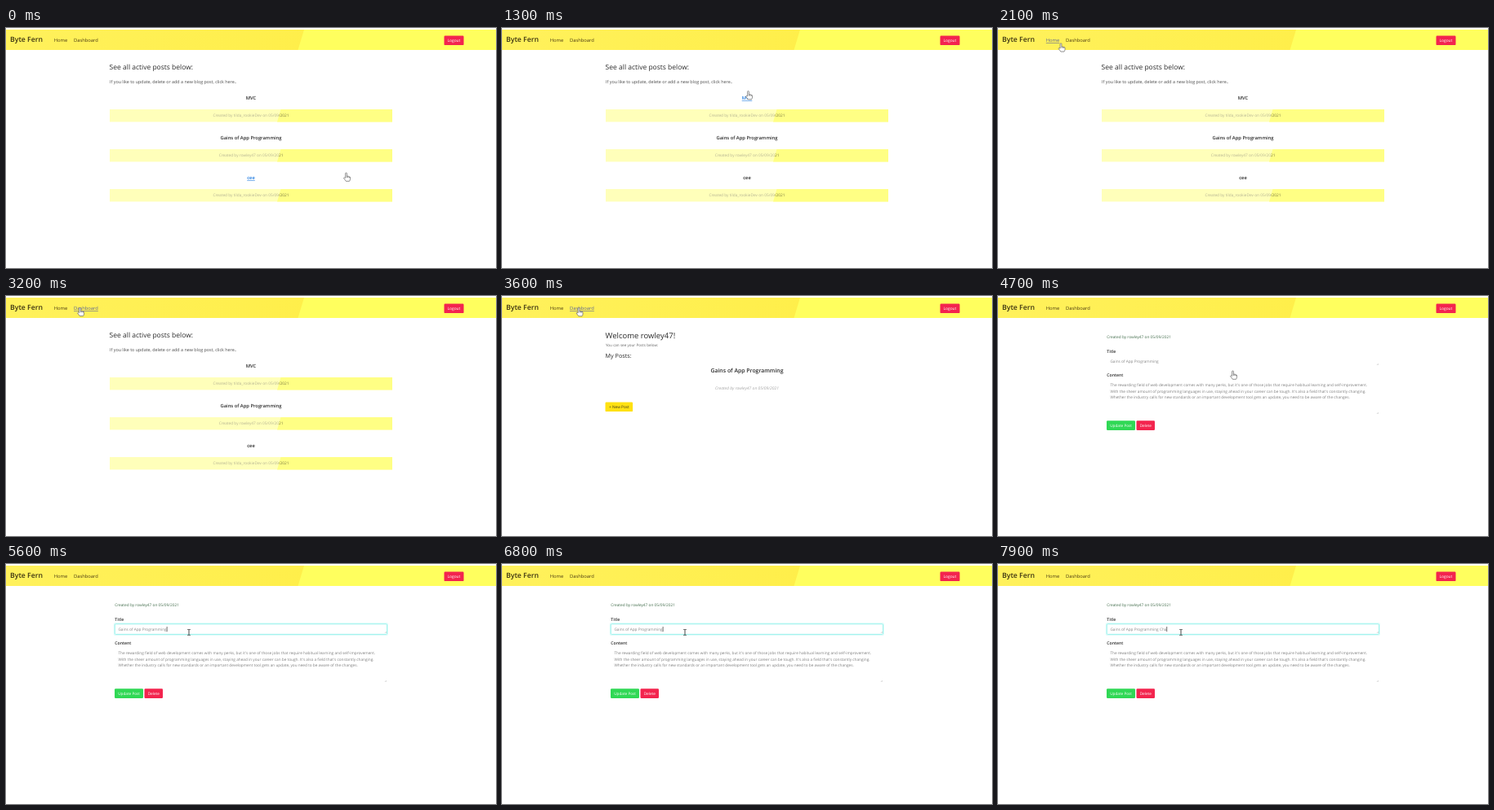
Animation, 600 px wide and 295 px high, one loop 8 s. Source, as an HTML page:

```html
<!DOCTYPE html>
<html lang="en">
<head>
<meta charset="utf-8">
<title>Blog walkthrough</title>
<style>
html, body { margin: 0; width: 100%; height: 100%; overflow: hidden; background: #fff; }
svg { display: block; width: 100%; height: 100%; }
text { font-family: "Open Sans", "Noto Sans", sans-serif; white-space: pre; text-rendering: geometricPrecision; }
</style>
</head>
<body>
<svg id="stage" viewBox="0 0 600 295">
  <defs>
    <linearGradient id="navFill">
      <stop offset="0" stop-color="#fff15c"/>
      <stop offset="1" stop-color="#ffed3f"/>
    </linearGradient>
    <linearGradient id="ink" gradientUnits="userSpaceOnUse" x1="0" x2="600">
      <stop offset=".556" stop-color="#b5b392"/>
      <stop offset=".556" stop-color="#77743f"/>
    </linearGradient>
  </defs>
  <g id="nav"></g>
  <g id="home"></g>
  <g id="dash"></g>
  <g id="edit"></g>
  <g id="cursor">
    <path id="hand" d="M-.9 6.3V.9A.9 .9 0 0 1 .9 .9V4.2Q1.8 3.6 2.4 4.5Q3.3 3.9 3.8 4.9Q5 4.5 5 6V7.5Q5 9 4 10.3H-.2Q-1.4 8.6 -3 6.5Q-2.6 5.2 -.9 6.3ZM.9 4.2V6M2.4 4.5V6M3.8 4.9V6.2" fill="#fff" stroke="#555" stroke-width=".65" stroke-linejoin="round"/>
    <path id="arrow" d="M0 0V8.6L2 6.8L3.3 9.7L4.6 9.1L3.3 6.3H6Z" fill="#fff" stroke="#444" stroke-width=".6"/>
    <path id="beam" d="M-1.7 -3.5H-.5L0 -3L.5 -3.5H1.7M0 -3V3M-1.7 3.5H-.5L0 3L.5 3.5H1.7" fill="none" stroke="#333" stroke-width=".9"/>
  </g>
</svg>
<script>
const LOOP = 8000;
const BLOG = "Byte Fern", USER = "rowley47", OTHER = "tilda_rookieDev";
const POST = "Gains of App Programming";
const LINK = "#1f7be0", DARK = "#2b2b2b", RED = "#f3244e";

const $ = id => document.getElementById(id);

function add(parent, tag, attrs) {
  const el = document.createElementNS("http://www.w3.org/2000/svg", tag);
  for (const k in attrs) el.setAttribute(k, attrs[k]);
  return parent.appendChild(el);
}

function label(parent, str, x, y, size, fill = DARK, extra = {}) {
  const el = add(parent, "text", { x, y, "font-size": size, fill, ...extra });
  el.textContent = str;
  return el;
}

const box = (parent, x, y, width, height, fill, rx = 0) =>
  add(parent, "rect", { x, y, width, height, fill, rx });

const shape = (parent, d, fill) => add(parent, "path", { d, fill });

const mid = { "text-anchor": "middle" };
const semi = { "font-weight": 600 };
const created = name => `Created by ${name} on 05/09/2021`;

function hover(el, on, plain, lit = LINK) {
  el.setAttribute("fill", on ? lit : plain);
  el.setAttribute("text-decoration", on ? "underline" : "none");
}

// Navigation bar
const nav = $("nav"), NAV_INK = "#4b3b12";
box(nav, 0, 2, 600, 25, "url(#navFill)");
shape(nav, "M365 2H600V27H357.5Z", "#ffff5e");
label(nav, BLOG, 5, 17.2, 8.7, "#3a3110", semi);
const homeLink = label(nav, "Home", 58.8, 17.1, 5.8, NAV_INK);
const dashLink = label(nav, "Dashboard", 83, 17.1, 5.8, NAV_INK);
box(nav, 536.5, 9.5, 24, 11.6, RED, 1.2);
label(nav, "Logout", 548.4, 17.1, 4.9, "#fff", mid);

// List of all posts
const home = $("home");
label(home, "See all active posts below:", 126.6, 50.6, 8.5, DARK, { "font-weight": 500 });
label(home, "If you like to update, delete or add a new blog post, click here..", 127, 68.4, 5.38, "#4a4a4a");
const rows = [["MVC", OTHER], [POST, USER], ["cee", OTHER]].map(([title, name], i) => {
  const y = 100 + i * 49;
  box(home, 127, y, 346, 15.4, "#ffffba");
  shape(home, `M336.5 ${y}H473V${y + 15.4}H332Z`, "#ffff84");
  label(home, created(name), 300, y + 9.2, 4.77, "url(#ink)", mid);
  return label(home, title, 300, y - 11.8, 5.8, DARK, { ...mid, ...semi });
});

// Own posts
const dash = $("dash");
label(dash, `Welcome ${USER}!`, 126.6, 51.6, 9.5, DARK);
label(dash, "You can see your Posts below:", 127, 61.6, 4.6, "#666");
label(dash, "My Posts:", 126.6, 75.9, 7.2, DARK);
const ownPost = label(dash, POST, 300, 93.8, 6.9, DARK, { ...mid, ...semi });
label(dash, created(USER), 300, 115, 5, "#a8a8a8", { ...mid, "font-style": "italic" });
box(dash, 126.5, 130.5, 33.6, 11.6, "#ffe112", 1.2);
label(dash, "+ New Post", 143.4, 138.1, 4.75, "#3d3a20", mid);

// Edit form
const edit = $("edit");
label(edit, created(USER), 133.2, 51.6, 4.77, "#456f4e");
label(edit, "Title", 133.3, 69.7, 5.2, DARK, semi);
label(edit, "Content", 133.3, 99.4, 5.2, DARK, semi);
const focus = add(edit, "g", {});
for (const [grow, width, opacity] of [[.7, 1.6, .3], [0, .8, 1]])
  add(focus, "rect", {
    x: 133.3 - grow, y: 73.8 - grow, width: 333.2 + 2 * grow, height: 12.6 + 2 * grow,
    rx: 1.2, fill: "none", stroke: "#8cf0ea", "stroke-width": width, opacity
  });
for (const y of [84.8, 144.8])
  add(edit, "path", { d: `M464 ${y}l1.8 -1.8M465.2 ${y}l.7 -.7`, stroke: "#999", "stroke-width": .4 });
const field = label(edit, POST, 137.4, 81.8, 4.74, "#858585");
const caret = box(edit, 0, 77, .7, 6.2, "#333");
[
  "The rewarding field of web development comes with many perks, but it's one of those jobs that require habitual learning and self-improvement.",
  "With the sheer amount of programming languages in use, staying ahead in your career can be tough. It's also a field that's constantly changing.",
  "Whether the industry calls for new standards or an important development tool gets an update, you need to be aware of the changes."
].forEach((line, i) => label(edit, line, 137.4, 111.4 + i * 7.5, 4.74, "#7d7d7d"));
box(edit, 133, 153.2, 35, 11.8, "#30d855", 1.2);
label(edit, "Update Post", 150.6, 160.9, 4.7, "#fff", mid);
box(edit, 169.5, 153.2, 22.5, 11.8, RED, 1.2);
label(edit, "Delete", 180.8, 160.9, 4.75, "#fff", mid);

// Pointer stops: time, x, y
const path = [
  [0, 416.5, 178], [600, 416.5, 178], [700, 417.6, 176], [900, 414.5, 176.5],
  [1100, 414.5, 176.5], [1200, 376, 147], [1300, 301.5, 77.5], [1400, 222, 51],
  [1500, 176, 45], [1600, 176, 45], [1800, 138, 35], [2000, 88, 21], [2200, 66, 16.5],
  [3000, 66, 16.5], [3100, 82, 16.5], [3200, 90.5, 14.3], [3500, 90.5, 14.3],
  [3600, 94, 14.5], [3800, 150, 38], [4000, 254, 80], [4200, 287.5, 92],
  [4700, 287.5, 92], [4900, 258, 89], [5100, 231, 85], [5300, 224, 84], [LOOP, 224, 84]
];

function pointer(t) {
  const i = path.findIndex(p => p[0] > t);
  const [t0, x0, y0] = path[i - 1], [t1, x1, y1] = path[i];
  const k = (t - t0) / (t1 - t0);
  return [x0 + (x1 - x0) * k, y0 + (y1 - y0) * k];
}

const show = (el, on) => el.setAttribute("display", on ? "inline" : "none");
const within = (v, a, b) => v >= a && v <= b;

function draw(t) {
  const page = t < 3600 ? "home" : t < 4700 ? "dash" : "edit";
  for (const id of ["home", "dash", "edit"]) show($(id), id === page);

  const [x, y] = pointer(t);
  const inNav = within(y, 10, 20);
  const onHome = inNav && within(x, 57, 77);
  const onDash = inNav && within(x, 81, 115);
  hover(homeLink, onHome, NAV_INK, "#5b6690");
  hover(dashLink, onDash, NAV_INK, "#5b6690");

  let onLink = onHome || onDash;
  rows.forEach((row, i) => {
    const on = page === "home" && within(x, 127, 473) && within(y, 76 + i * 49, 92 + i * 49);
    hover(row, on, DARK);
    onLink = onLink || on;
  });
  const onPost = page === "dash" && within(x, 127, 473) && within(y, 86, 98);
  hover(ownPost, onPost, DARK);
  onLink = onLink || onPost || t === 4700;

  const onText = page === "edit" && !onLink && y < 87;
  show($("hand"), onLink);
  show($("beam"), onText);
  show($("arrow"), !onLink && !onText);
  $("cursor").setAttribute("transform", `translate(${x} ${y})`);

  focus.setAttribute("opacity", t < 5500 ? 0 : t < 5600 ? .5 : 1);
  field.textContent = POST + (t >= 7900 ? " Cha" : t >= 7200 ? " " : "");
  const blinkOff = within(t, 6200, 6799) || within(t, 7700, 7899);
  show(caret, t >= 5500 && !blinkOff);
  if (page === "edit") caret.setAttribute("x", 137.4 + field.getComputedTextLength());
}

const start = performance.now();
function tick() {
  const t = (performance.now() - start) % LOOP;
  draw(Math.floor(t / 100) * 100);
  requestAnimationFrame(tick);
}
tick();
</script>
</body>
</html>
```
